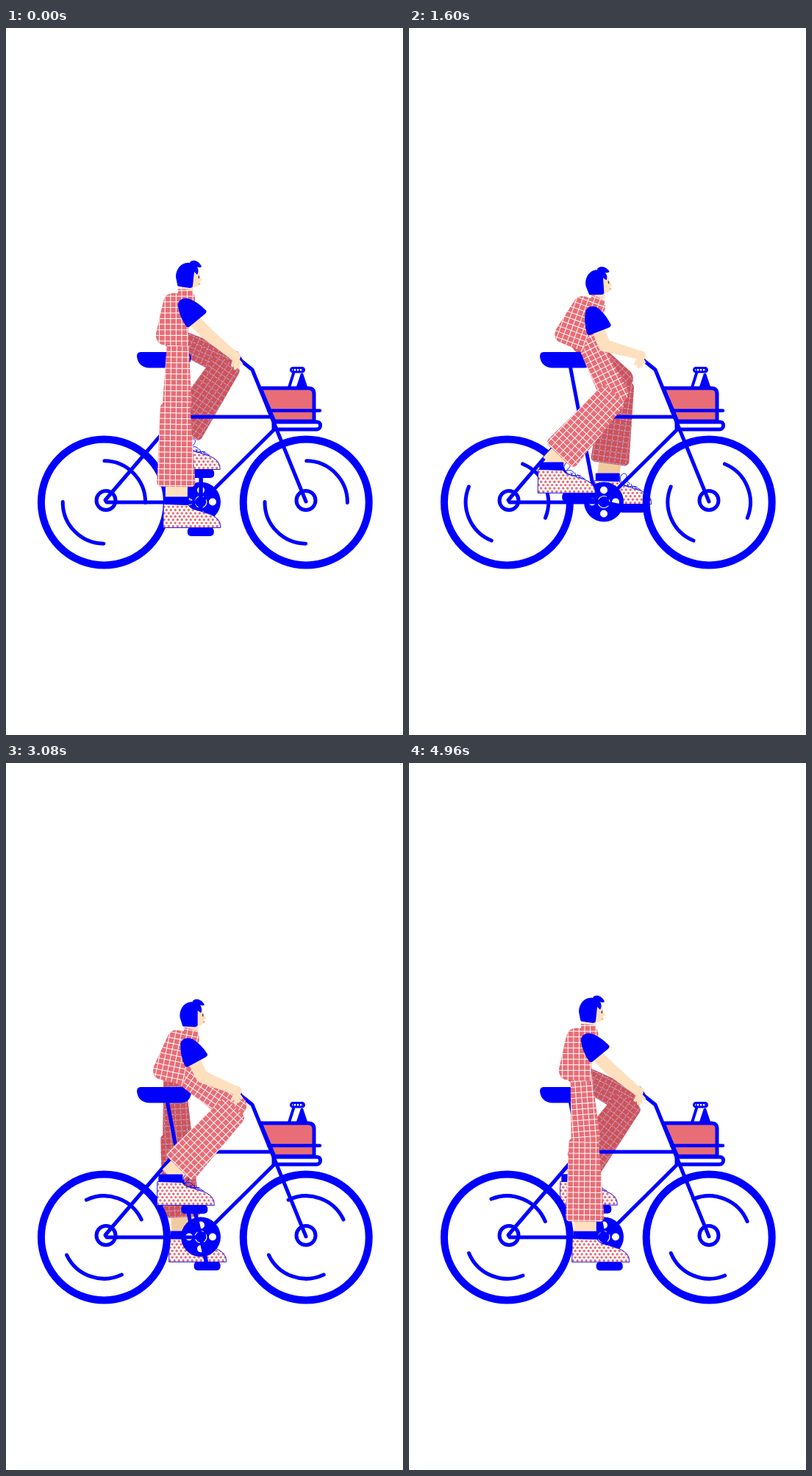
An HTML page with a canvas that plays this animation: 540x960 px, repeating every 5000 ms.

```html
<!DOCTYPE html>
<html lang="en">
<head>
<meta charset="utf-8">
<title>Cyclist</title>
<style>
  html, body { margin: 0; width: 100%; height: 100%; overflow: hidden; background: #fff; }
  canvas { display: block; }
</style>
</head>
<body>
<canvas id="stage" width="540" height="960"></canvas>
<script>
const c = document.getElementById('stage').getContext('2d');
const LOOP = 5000, RAD = Math.PI / 180, TAU = Math.PI * 2;
const BLUE = '#0000ff', RED = '#e86d76', DARK = '#cd5358', SKIN = '#fee0be', SHADE = '#f0cba0';

const CRANK = { x: 265, y: 644.5, r: 39.5 };
const WHEELS = [133.4, 408.2], AXLE = 644;
const SHIN = 128, UPPER = 37.5, FORE = 49;
const NEAR = { thigh: 91, up: [234, 421], down: [240, 419], shoe: 51, skin: SKIN, far: false };
const FAR = { thigh: 85, up: [227, 421], down: [230, 421], shoe: 52, skin: SHADE, far: true };

const HAIR = new Path2D('M231 338C231 326 240 317 250 319C251 314 262 314 266 324C264 326 261 325 260 324C262 328 262 332 260 335L256 331L254 350Q254 353 250 353L236 351Q233 351 233 348Z');
const FACE = new Path2D('M248 324L262 327Q264 333 264 339L267 342.5L264 344L263.5 348Q262 351 255 352L254 359L238 357L240 345Z');
const TORSO = new Path2D('M234 354L253 356L254 361Q258 362 257 372L248 400L248 432L212 430Q203 427 204 415L214 371Q217 360 227 360L234 360Z');
const SLEEVE = new Path2D('M234 378C233 369 242 365 250 368Q262 373 271.5 383Q274 385 271 388L249 406Q246 407 245 405Q236 392 234 378Z');
const SHOE = new Path2D('M0 0L.5 -32L34 -31Q38 -25 46 -24L62 -19Q79 -13 78 0Z');
const LACES = new Path2D('M37 -30C33 -37 39 -44 43 -41C47 -38 41 -32 38 -30C44 -32 49 -30 48 -27C45 -23 40 -26 38 -30M45 -28L47 -23M50 -28L53 -21M48 -24L58 -24M54 -25L59 -19M57 -23L64 -19');
const BASKET = new Path2D('M346 489H411Q419 489 419 497V534H365Z');
const SADDLE = new Path2D('M183 440H245Q252 441 252 448Q250 461 238 461.5H195Q180 461 178 446Q178 440 183 440Z');

const mix = (a, b, k) => a + (b - a) * k;
const mixPt = (a, b, k) => ({ x: mix(a[0], b[0], k), y: mix(a[1], b[1], k) });

function ease(t, from, to) {
  const k = Math.min(1, Math.max(0, (t - from) / (to - from)));
  return k * k * (3 - 2 * k);
}

function fill(path, color) {
  c.fillStyle = color;
  c.fill(path);
}

function disc(x, y, r, color) {
  c.fillStyle = color;
  c.beginPath();
  c.arc(x, y, r, 0, TAU);
  c.fill();
}

function ring(x, y, r, width, color = BLUE, from = 0, to = TAU) {
  c.strokeStyle = color;
  c.lineWidth = width;
  c.beginPath();
  c.arc(x, y, r, from, to);
  c.stroke();
}

function line(color, width, ...pts) {
  c.strokeStyle = color;
  c.lineWidth = width;
  c.beginPath();
  for (let i = 0; i < pts.length; i += 2) c.lineTo(pts[i], pts[i + 1]);
  c.stroke();
}

function box(x, y, w, h, r, color, edge) {
  c.beginPath();
  c.roundRect(x, y, w, h, r);
  c.fillStyle = color;
  c.fill();
  if (edge) {
    c.strokeStyle = BLUE;
    c.lineWidth = edge;
    c.stroke();
  }
}

function roundPoly(pts, radii) {
  const path = new Path2D(), n = pts.length, [a, b] = [pts[n - 1], pts[0]];
  path.moveTo((a[0] + b[0]) / 2, (a[1] + b[1]) / 2);
  pts.forEach((p, i) => path.arcTo(...p, ...pts[(i + 1) % n], radii[i]));
  path.closePath();
  return path;
}

// Turn about one point, then carry that point to another
function pose(from, to, degrees, k, draw) {
  c.save();
  c.translate(mix(from[0], to[0], k), mix(from[1], to[1], k));
  c.rotate(degrees * RAD * k);
  c.translate(-from[0], -from[1]);
  draw();
  c.restore();
}

// Middle joint of a two-bone limb; side picks the bend direction
function joint(a, b, l1, l2, side) {
  const dx = b.x - a.x, dy = b.y - a.y, full = Math.hypot(dx, dy);
  const d = Math.min(full, l1 + l2), ux = dx / full, uy = dy / full;
  const along = (l1 * l1 - l2 * l2 + d * d) / (2 * d);
  const off = side * Math.sqrt(Math.max(0, l1 * l1 - along * along));
  return { x: a.x + ux * along + uy * off, y: a.y + uy * along - ux * off };
}

function gridLines(x0, y0, x1, y1, step) {
  c.beginPath();
  for (let x = x0; x < x1; x += step) { c.moveTo(x, y0); c.lineTo(x, y1); }
  for (let y = y0; y < y1; y += step) { c.moveTo(x0, y); c.lineTo(x1, y); }
  c.stroke();
}

function cloth(path, area, far) {
  c.save();
  fill(path, far ? DARK : RED);
  c.clip(path);
  c.lineCap = 'butt';
  c.strokeStyle = far ? '#dfa0a2' : '#fff';
  c.lineWidth = 1;
  gridLines(...area, 7.6);
  if (far) {
    c.strokeStyle = '#5a4af0';
    c.lineWidth = 0.8;
    c.setLineDash([1.2, 3.6]);
    gridLines(...area, 7.6);
  }
  c.restore();
}

function segment(a, b, pts, radii, far) {
  c.save();
  c.translate(a.x, a.y);
  c.rotate(Math.atan2(b.y - a.y, b.x - a.x) - Math.PI / 2);
  cloth(roundPoly(pts, radii), [-32, -12, 32, 140], far);
  c.restore();
}

function shoe(x, y) {
  c.save();
  c.translate(x, y);
  box(2, -42, 33, 13, 1, BLUE);
  fill(SHOE, '#fff');
  c.save();
  c.clip(SHOE);
  for (let row = 0; row < 8; row++)
    for (let col = 0; col < 14; col++)
      disc(col * 6 + (row % 2) * 3 + 1.5, -2 - row * 4.4, 1.7, RED);
  c.restore();
  c.strokeStyle = BLUE;
  c.lineWidth = 0.9;
  c.stroke(SHOE);
  c.stroke(LACES);
  c.restore();
}

function leg(side, pedal, lean) {
  const { thigh, far } = side;
  const hip = mixPt(side.up, side.down, lean);
  const ankle = { x: pedal.x - 33, y: pedal.y - 43.5 };
  const knee = joint(hip, ankle, thigh, SHIN, 1);
  const k = 32 / SHIN;
  c.lineCap = 'butt';
  line(side.skin, 30, mix(ankle.x, knee.x, k), mix(ankle.y, knee.y, k), ankle.x, ankle.y);
  shoe(pedal.x - side.shoe, pedal.y - 5.5);
  segment(hip, knee, [[-14, -6], [14, -6], [20, thigh + 11], [-21, thigh + 11]], [4, 4, 14, 14], far);
  segment(knee, ankle, [[-23, -2], [17, -2], [26, SHIN - 17], [-27, SHIN - 17]], [5, 6, 6, 6], far);
}

function wheel(x, turn) {
  ring(x, AXLE, 85.5, 10);
  for (const a of [-90, 90]) ring(x, AXLE, 56.2, 5, BLUE, (a + turn) * RAD, (a + 90 + turn) * RAD);
}

function bottle() {
  c.fillStyle = BLUE;
  c.beginPath();
  c.moveTo(401, 469);
  c.lineTo(404, 469);
  c.lineTo(411, 490);
  c.lineTo(394, 490);
  c.fill();
  line(BLUE, 4, 391, 469, 385, 488);
  box(387.5, 461.5, 18, 5.5, 3, '#fff', 3);
  for (let x = 391; x < 404; x += 4) line(BLUE, 1.6, x, 461, x, 467);
}

function bike(turn, pedals) {
  for (const x of WHEELS) wheel(x, turn);
  ring(136, 641.5, 13, 5);
  ring(408, 641.5, 13, 5);

  disc(265, 643.5, 27, BLUE);
  for (const [x, y] of [[0, -16], [16, 0], [0, 16], [-16, 0]]) disc(265 + x, 643.5 + y, 5, '#fff');
  ring(265, 643.5, 8, 1.2, '#fff');

  line(BLUE, 5, 265, 644, 137, 644, 135, 641, 232, 528, 362, 528);
  line(BLUE, 5, 219, 458, 253, 636);
  line(BLUE, 5, 367, 543, 265, 644);
  line(BLUE, 5.5, pedals[0].x, pedals[0].y, pedals[1].x, pedals[1].y);
  for (const p of pedals) box(p.x - 18, p.y - 6, 36, 12, 5, BLUE);

  fill(SADDLE, BLUE);
  bottle();
  fill(BASKET, RED);
  c.strokeStyle = BLUE;
  c.lineWidth = 5;
  c.stroke(BASKET);
  line(BLUE, 4.5, 357, 519.5, 427, 519.5);
  box(364, 535, 63.5, 10, [1, 4, 5, 1], '#fff', 5);
  line(BLUE, 5, 314, 442, 320, 452, 335, 464, 408, 643);
}

function arm(lean) {
  const shoulder = mixPt([246, 387], [252, 396], lean);
  const wrist = mixPt([310, 445], [313, 444], lean);
  const elbow = joint(shoulder, wrist, UPPER, FORE, -1);
  const a = Math.atan2(wrist.y - elbow.y, wrist.x - elbow.x);
  const nx = -Math.sin(a), ny = Math.cos(a);
  line(SKIN, 17, shoulder.x, shoulder.y, elbow.x, elbow.y);
  c.fillStyle = SKIN;
  c.beginPath();
  c.moveTo(elbow.x + nx * 8.5, elbow.y + ny * 8.5);
  c.lineTo(wrist.x + nx * 6, wrist.y + ny * 6);
  c.lineTo(wrist.x - nx * 6, wrist.y - ny * 6);
  c.lineTo(elbow.x - nx * 8.5, elbow.y - ny * 8.5);
  c.fill();
  disc(wrist.x + 2, wrist.y + 1, 7, SKIN);
  const drop = 2 - 2 * lean;
  for (const [x, y] of [[308, 456], [312, 460], [316, 458.5], [320, 454]])
    line(SKIN, 4.2, wrist.x + 2, wrist.y + 2, x, y + drop);
}

function head() {
  fill(FACE, SKIN);
  fill(HAIR, BLUE);
  line('#202080', 1.3, 262.3, 337, 262.3, 339.5);
  line(RED, 0.9, 262, 347.5, 264, 347.5);
}

function draw(t) {
  const lean = ease(t, 1000, 1600) - ease(t, 2720, 3540);
  const spin = (90 + t * 4 * 360 / LOOP) * RAD;
  const dx = Math.cos(spin) * CRANK.r, dy = Math.sin(spin) * CRANK.r;
  const near = { x: CRANK.x + dx, y: CRANK.y + dy };
  const far = { x: CRANK.x - dx, y: CRANK.y - dy };

  c.fillStyle = '#fff';
  c.fillRect(0, 0, 540, 960);
  c.lineJoin = 'round';

  leg(FAR, far, lean);
  c.lineCap = 'round';
  bike(t * 8 * 360 / LOOP, [near, far]);
  leg(NEAR, near, lean);

  c.lineCap = 'round';
  pose([246, 336], [255, 346], -10, lean, head);
  pose([244, 356], [258, 367], 20, lean, () => cloth(TORSO, [201, 349, 262, 436], false));
  arm(lean);
  pose([250, 382], [254, 394.5], 18, lean, () => fill(SLEEVE, BLUE));
}

function tick(now) {
  draw(now % LOOP);
  requestAnimationFrame(tick);
}
draw(0);
requestAnimationFrame(tick);
</script>
</body>
</html>
```
